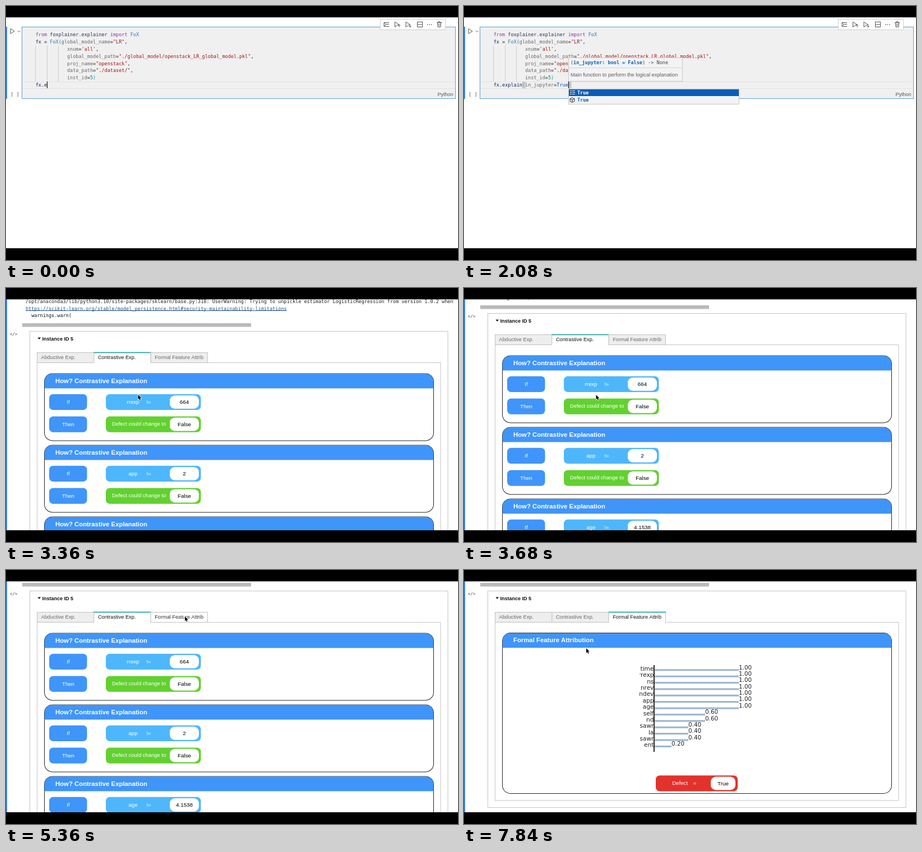
An HTML page with a canvas that plays this animation: 806 px wide and 454 px high, repeating every 7920 ms.

```html
<!DOCTYPE html>
<html lang="en">
<head>
<meta charset="utf-8">
<title>Notebook explanation demo</title>
<style>
html, body { margin: 0; width: 100%; height: 100%; overflow: hidden; background: #fff; }
canvas { display: block; }
</style>
</head>
<body>
<canvas id="stage" width="806" height="454"></canvas>
<script>
const g = document.getElementById('stage').getContext('2d');
const LOOP = 7920, STEP = 80;
const SANS = '"Liberation Sans", Arial, sans-serif';
const MONO = '"DejaVu Sans Mono", monospace';
const PLOT = '"DejaVu Sans", sans-serif';
const CHAR = 5.12, CODE_X = 52.7;
const BLUE = '#3f95fa', SKY = '#4eb7fc', GREEN = '#62d130', RED = '#e3322c';
const NAVY = '#14246e', PURPLE = '#8d35b5', CLASS = '#2b7fb5', PARAM = '#686868', STR = '#a31515', INK = '#222';

function text(s, x, cy, size, color, o = {}) {
  g.font = `${o.bold ? 'bold ' : ''}${size}px ${o.font || SANS}`;
  g.textAlign = o.align || 'left';
  g.fillStyle = color;
  g.fillText(s, x, cy + size * 0.36);
}
const mono = (s, x, cy, color, bold) => text(s, x, cy, 8.5, color, { font: MONO, bold });
function rect(x, y, x2, y2, fill, stroke) {
  if (fill) { g.fillStyle = fill; g.fillRect(x, y, x2 - x, y2 - y); }
  if (stroke) { g.strokeStyle = stroke; g.lineWidth = 1; g.strokeRect(x + .5, y + .5, x2 - x - 1, y2 - y - 1); }
}
function round(x, y, x2, y2, r, fill) {
  g.beginPath(); g.roundRect(x, y, x2 - x, y2 - y, r);
  g.fillStyle = fill; g.fill();
}
function line(points, color, width = 1, close) {
  g.beginPath();
  points.forEach(([x, y]) => g.lineTo(x, y));
  if (close) g.closePath();
  g.strokeStyle = color; g.lineWidth = width; g.stroke();
}
function poly(points, fill) {
  g.beginPath();
  points.forEach(([x, y]) => g.lineTo(x, y));
  g.fillStyle = fill; g.fill();
}

// keys: [time, value, value...], eased between neighbours
function track(keys, t) {
  let i = keys.findIndex(k => k[0] > t);
  if (i < 0) return keys[keys.length - 1].slice(1);
  if (i === 0) return keys[0].slice(1);
  const a = keys[i - 1], b = keys[i];
  let u = (t - a[0]) / (b[0] - a[0]);
  u = u * u * (3 - 2 * u);
  return a.slice(1).map((v, n) => v + (b[n + 1] - v) * u);
}
const SCROLL = [[2320, 247], [2640, 72], [3200, 72], [3360, 90], [3680, 58], [4000, 34.5],
  [4400, -20], [4640, -20], [5040, 50]];
const MOUSE = [[2640, 197, 106], [2960, 235.5, 191], [4960, 235.5, 191], [5360, 319, 83], [5680, 319, 83],
  [6320, 415, 250], [6640, 410, 330], [7120, 330, 250], [7600, 218, 140]];
const RUN = 2240, SHOW_CHART = 5520;

const CODE = [
  [['from ', PURPLE], ['foxplainer.explainer ', '#26305c'], ['import ', PURPLE], ['FoX', CLASS]],
  [['fx', NAVY], [' = ', INK], ['FoX', CLASS], ['(', CLASS], ['global_model_name', PARAM], ['=', INK], ['"LR"', STR], [',', INK]],
  ...[['xnum', "'all'"], ['global_model_path', '"./global_model/openstack_LR_global_model.pkl"'],
    ['proj_name', '"openstack"'], ['data_path', '"./dataset/"']].map(([name, value]) =>
    [[' '.repeat(11) + name, PARAM], ['=', INK], [value, STR], [',', INK]]),
  [[' '.repeat(11) + 'inst_id', PARAM], ['=', INK], ['5', '#098658'], [')', CLASS]]
];
const rowY = i => 51.2 + i * 12.83;

function tokens(parts, y) {
  let x = CODE_X;
  for (const [s, color] of parts) {
    mono(s, x, y, color);
    x += s.length * CHAR;
  }
}

const TYPING = [[0, 'e'], [160, 'ex'], [240, 'exp'], [320, 'explain'], [400, 'explain('], [480, 'explain(i'],
  [560, 'explain(in'], [640, 'explain(in_'], [720, 'explain(in_j'], [880, 'explain(in_jupyter='],
  [1040, 'explain(in_jupyter=T'], [1120, 'explain(in_jupyter=Tr'], [1200, 'explain(in_jupyter=Tru'],
  [1280, 'explain(in_jupyter=True']];
const typedAt = t => TYPING.filter(k => k[0] <= t).pop()[1];

function toolbar() {
  rect(667, 23, 784, 43, '#fff', '#cfcfcf');
  const c = '#555';
  for (const y of [29.5, 32.5, 36.5]) line([[y === 32.5 ? 678 : 674, y], [683, y]], c);
  line([[674, 30], [677.5, 33], [674, 36], [674, 30]], c);
  for (const x of [693.5, 713]) line([[x, 28.5], [x + 7, 33], [x, 37.5]], c, 1, true);
  line([[701, 38], [701, 33.5]], c); line([[699, 35], [701, 33], [703, 35]], c);
  line([[720.5, 33], [720.5, 38]], c); line([[718.5, 36], [720.5, 38], [722.5, 36]], c);
  rect(733, 28, 743, 38, null, c); line([[733, 33], [743, 33]], c);
  for (const x of [751, 754.5, 758]) rect(x, 32.5, x + 1.4, 34, c);
  line([[768, 29.5], [777, 29.5]], c); line([[771, 29], [771, 28], [774, 28], [774, 29]], c);
  line([[769.5, 30], [770, 37.5], [775, 37.5], [775.5, 30]], c);
  line([[771.5, 31], [771.5, 36]], c, .7); line([[773.5, 31], [773.5, 36]], c, .7);
}

function cell(t) {
  rect(28, 37, 802, 166, '#f0f0f0', '#5a9fd0');
  line([[8, 40.5], [15, 45], [8, 49.5]], '#555', 1, true);
  line([[20.5, 44], [23, 46.5], [25.5, 44]], '#666');
  text('[ ]', 16, 158, 8.5, '#555', { font: MONO, align: 'center' });
  text('Python', 797.5, 158, 9, '#555', { align: 'right' });
  rect(29, 135, 801, 136, '#e2e2e2');
  rect(29, 147, 801, 148, '#e2e2e2');
  for (const x of [52, 73, 93]) rect(x, 71, x + 1, 135, '#cdcdcd');
  CODE.forEach((parts, i) => tokens(parts, rowY(i)));

  const typed = typedAt(t), y = rowY(7), open = typed.indexOf('(') >= 0;
  const caret = CODE_X + (3 + typed.length) * CHAR;
  if (open) {
    const p = CODE_X + 10 * CHAR;
    rect(p, 135.5, p + 5.5, 147, '#e0e8e0', '#a9b5a9');
    rect(caret, 135.5, caret + 5.5, 147, '#e0e8e0', '#a9b5a9');
  }
  const parts = [['fx', NAVY], ['.', INK], [typed.split('(')[0], open ? NAVY : INK]];
  if (open) {
    const [name, value] = typed.slice(8).split('=');
    parts.push(['(', CLASS], [name, PARAM]);
    if (value !== undefined) parts.push(['=', INK], [value, '#0b4fa8']);
    parts.push([')', CLASS]);
  }
  tokens(parts, y);
  if (t < RUN) rect(Math.round(caret - .3), 135, Math.round(caret - .3) + 1, 147, '#000');
  toolbar();
  if (open && t < RUN) popups(t, Math.round(caret));
}

function popups(t, x) {
  rect(x, 92, x + 204, 135, '#f3f3f3', '#c8c8c8');
  rect(x + 1, 110, x + 203, 111, '#d4d4d4');
  mono('(', x + 4, 101, '#444');
  mono('in_jupyter: bool = False', x + 4 + CHAR, 101, '#0b62b8', true);
  mono(') -> None', x + 4 + CHAR * 25, 101, '#444');
  text('Main function to perform the logical explanation', x + 4, 122.5, 9.15, '#5c5c5c');
  if (t >= 720 && t < 880) suggestions(x, ['in_jupyter=']);
  else if (t >= 1360) suggestions(x, ['True', 'True']);
}

function suggestions(x, items) {
  rect(x, 148, x + 305, 150 + 13 * items.length, '#f3f3f3', '#c8c8c8');
  items.forEach((s, i) => {
    const y = 155 + i * 12.8, c = i ? '#333' : '#fff';
    if (!i) rect(x + 1, 149, x + 304, 161, '#0a5cbb');
    mono(s, x + 16, y, i ? '#0b62b8' : '#fff', true);
    if (i) {
      line([[x + 7, y - 4], [x + 11, y - 2], [x + 11, y + 2.5], [x + 7, y + 4.5], [x + 3, y + 2.5], [x + 3, y - 2]], c, 1, true);
      line([[x + 3, y - 2], [x + 7, y], [x + 11, y - 2]], c);
      line([[x + 7, y], [x + 7, y + 4]], c);
    } else {
      for (const d of [-3.5, -.5, 2.5]) {
        line([[x + 3, y + d], [x + 6, y + d]], c);
        line([[x + 7, y + d], [x + 12, y + d]], c);
      }
    }
  });
}

function warning(h) {
  g.save();
  g.beginPath(); g.rect(29, 0, 773, 454); g.clip();
  mono('/opt/anaconda3/lib/python3.10/site-packages/sklearn/base.py:318: UserWarning: Trying to unpickle estimator ' +
    'LogisticRegression from version 1.0.2 when using version 1.2.0. This might lead to breaking code or invalid results.',
    35, h - 66, INK);
  mono('https://scikit-learn.org/stable/model_persistence.html#security-maintainability-limitations', 35, h - 53.5, '#2a5a88');
  rect(35, h - 50, 500, h - 49, '#2a5a88');
  mono('  warnings.warn(', 35, h - 41, '#111');
  g.restore();
  rect(29, h - 27, 437, h - 20.5, '#bababa');
}

function card(y, y2, title) {
  round(68, y, 763, y2, 15, '#222');
  round(69, y + 1, 762, y2 - 1, 14, '#fff');
  g.save();
  g.beginPath(); g.roundRect(68.7, y + .8, 693.6, y2 - y - 1.6, 14.3); g.clip();
  rect(68, y, 763, y + 27, BLUE);
  g.restore();
  text(title, 88, y + 13.2, 11.35, '#fff', { bold: true });
}

function pill(x, x2, y, color) { round(x, y, x2, y + 28.3, 7, color); }
function label(s, x, y, size = 9.55, color = '#fff') { text(s, x, y, size, color, { align: 'center' }); }
function value(s, x, x2, y) {
  round(x, y + 2.3, x2, y + 26, 9, '#fff');
  label(s, (x + x2) / 2, y + 14.2, 9.9, '#000');
}

function contrast(y, feature, val) {
  card(y, y + 121, 'How? Contrastive Explanation');
  const a = y + 37.3, b = y + 77;
  pill(77, 144.5, a, BLUE); label('If', 111, a + 13.7);
  pill(77, 144.5, b, BLUE); label('Then', 111, b + 13.7);
  pill(178, 347.5, a, SKY); label(feature, 226.5, a + 13.7); label('!=', 254.5, a + 13.7);
  value(val, 292, 344, a);
  pill(178, 347.5, b, GREEN); label('Defect could change to', 237, b + 13.7, 9.42);
  value('False', 292, 344, b);
}

const BARS = [['time', 1], ['rrexp', 1], ['ns', 1], ['nrev', 1], ['ndev', 1], ['app', 1], ['age', 1],
  ['self', .6], ['nd', .6], ['osawr', .4], ['la', .4], ['asawr', .4], ['ent', .2]];

function chart(h) {
  card(h + 62, h + 350, 'Formal Feature Attribution');
  g.save();
  g.beginPath(); g.rect(313, h + 110, 220, 180); g.clip();
  BARS.forEach(([name, v], i) => {
    const y = h + 128.8 + i * 11.38, end = 340 + v * 150;
    rect(340, y - 1.6, end, y + 1.6, '#a0b6d0');
    text(name, 338.3, y - 2.7, 10.5, '#222', { font: PLOT, align: 'right' });
    text(v.toFixed(2), end, y - 5, 10.4, '#222', { font: PLOT });
  });
  rect(338, h + 120, 339.8, h + 275, '#111');
  g.restore();
  const y = h + 317.2;
  pill(342, 488, y, RED);
  label('Defect', 385, y + 13.7); label('=', 411.5, y + 13.7);
  value('True', 440, 484, y);
}

function output(h, t, mx, my) {
  const charted = t >= SHOW_CHART;
  warning(h);
  text('</>', 13.5, h - 8, 7.5, '#444', { font: MONO, align: 'center' });
  rect(42, h - 13, 788.5, charted ? h + 375 : h + 900, '#fff', '#c4c4c4');
  poly([[56.5, h - 1.5], [62, h - 1.5], [59.2, h + 2]], '#111');
  text('Instance ID 5', 64.5, h + .3, 9, '#111', { bold: true });
  rect(55, h + 43, 775.5, charted ? h + 362.5 : h + 880, '#fff', '#c4c4c4');
  const active = charted ? 2 : 1;
  ['Abductive Exp.', 'Contrastive Exp.', 'Formal Feature Attrib'].forEach((s, i) => {
    const x = 55 + i * 101.3, top = h + 25, on = i === active;
    const hover = !on && mx > x && mx < x + 101 && my > top && my < top + 19;
    rect(x, top, x + 102.3, h + 44, on || hover ? '#fff' : '#eee', '#c0c0c0');
    if (on) {
      rect(x + 1, h + 42, x + 101.3, h + 45, '#fff');
      rect(x, top - .5, x + 102.3, top + 1.3, '#2aa5a8');
    }
    text(s, x + 7.6, h + 34, 9.2, on ? '#111' : hover ? '#333' : '#6a6a6a');
  });
  if (charted) chart(h);
  else [['rrexp', '664'], ['app', '2'], ['age', '4.1538'], ['nrev', '3'], ['ns', '1']]
    .forEach(([f, v], i) => contrast(h + 62.4 + i * 128, f, v));
}

function pointer(x, y) {
  const shape = [[0, 0], [0, 8.2], [1.9, 6.5], [3.2, 9.4], [4.6, 8.8], [3.3, 6], [5.8, 5.8]].map(p => [x + p[0], y + p[1]]);
  line(shape, '#fff', 1.4, true);
  poly(shape, '#000');
}

function draw(t) {
  rect(0, 0, 806, 454, '#fff');
  const [h] = track(SCROLL, t), [mx, my] = track(MOUSE, t), ran = t >= RUN;
  const shift = h - 247;
  rect(0, Math.max(20, 37 + shift), 2, ran ? 433 : 166, '#3b84dc');
  if (shift > -170) {
    g.save(); g.translate(0, shift); cell(t); g.restore();
  }
  if (ran) output(h, t, mx, my);
  if (t >= 2640) pointer(mx, my);
  rect(0, 0, 806, 20.3, '#000');
  rect(0, 433, 806, 454, '#000');
}

function tick() {
  const t = performance.now() % LOOP;
  draw(Math.floor(t / STEP) * STEP);
  requestAnimationFrame(tick);
}
tick();
</script>
</body>
</html>
```
